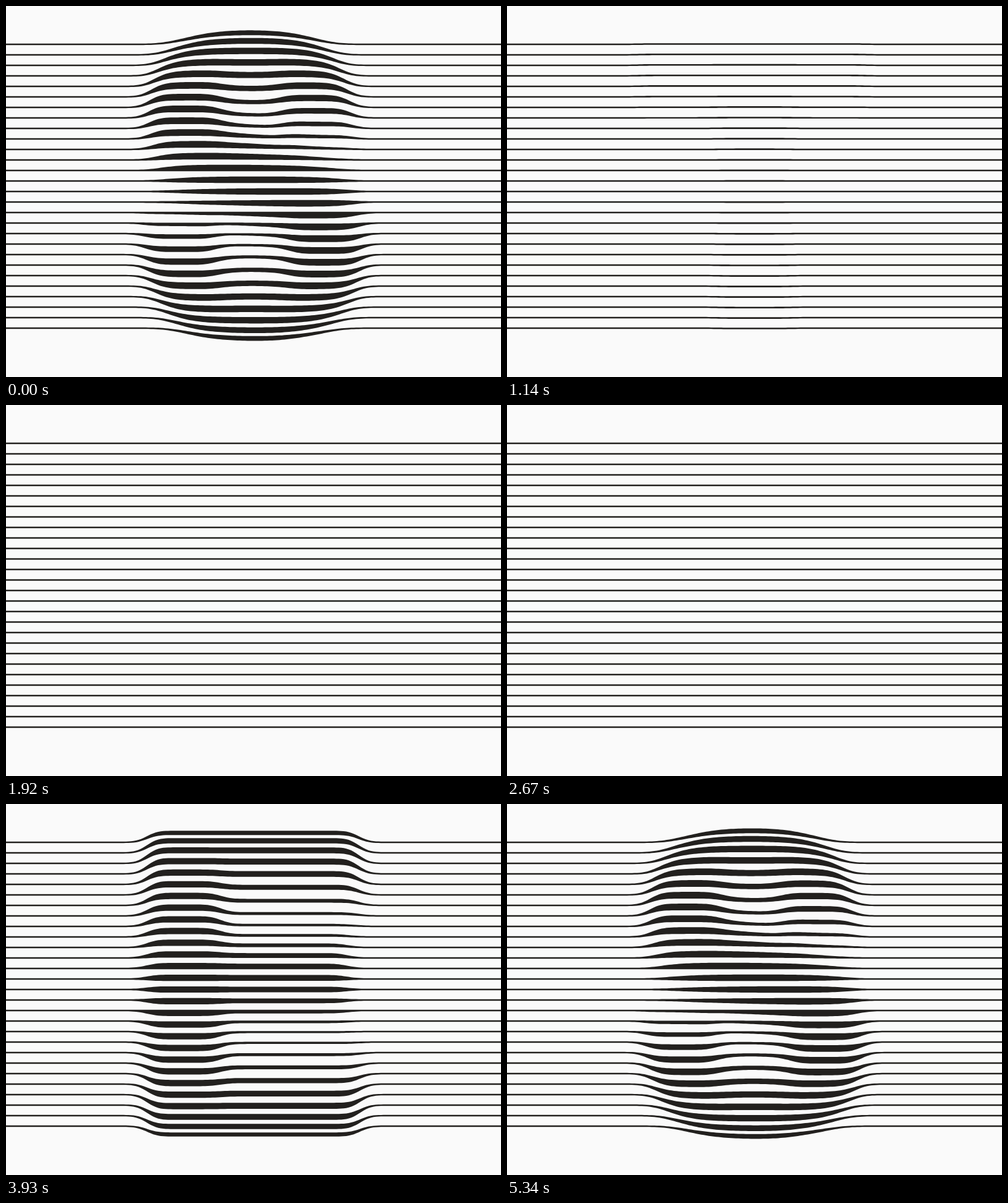
Animation of 800x600 px, one loop 5370 ms. Source, as an HTML page with a canvas:

```html
<!DOCTYPE html>
<html lang="en">
<head>
<meta charset="utf-8">
<title>Striped</title>
<style>
  html, body { margin: 0; width: 100%; height: 100%; overflow: hidden; background: #fafafa; }
  canvas { display: block; }
</style>
</head>
<body>
<canvas id="stage" width="800" height="600"></canvas>
<script>
const W = 800, H = 600, CELL = 4, COLS = W / CELL, ROWS = H / CELL;
const LINES = 28, FIRST = 62, GAP = 17, MIDDLE = 300;
const THIN = 2.4, SWELL = 8.5, PUSH = 0.122;
const LOOP = 5370, SLOT = 750, FADE = 330, HOLD = 90, TICK = 30;

// The letters of the word; the first is a thick stroke, the rest are filled.
const LETTERS = [
  'M506 203C506 140 465 107 395 107C325 107 284 140 284 185C284 245 340 262 400 281' +
    'C470 302 520 325 520 388C520 445 465 474 395 474C325 474 278 440 278 362',
  'M213 57H579V163H460V524H340V163H213Z',
  'M213 57H420C525 57 572 110 572 185C572 245 540 285 495 308L590 524H460L378 330H325V524H213Z' +
    'M325 160H410C445 160 457 175 457 197S445 235 410 235H325Z',
  'M340 57H460V524H340Z',
  'M228 57H430C535 57 588 115 588 210S535 365 430 365H345V524H228Z' +
    'M345 165H420C458 165 472 180 472 211S458 258 420 258H345Z',
  'M228 57H570V163H347V235H551V330H347V418H572V524H228Z',
  'M212 57H400C530 57 590 150 590 290S530 524 400 524H212Z' +
    'M322 172H385C450 172 478 215 478 290S450 410 385 410H322Z'
];

const ctx = document.getElementById('stage').getContext('2d');
const lineY = i => FIRST + GAP * i;

// Gaussian average of value(k) around a position, in cells
function blur(value, count, pos, sigma) {
  let sum = 0, total = 0;
  for (let k = Math.ceil(pos - 3 * sigma); k <= pos + 3 * sigma; k++) {
    const w = Math.exp(-((k - pos) ** 2) / (2 * sigma * sigma));
    total += w;
    if (k >= 0 && k < count) sum += w * value(k);
  }
  return sum / total;
}

// Softened coverage of a letter along every line
function makeField(shape, index) {
  const pad = document.createElement('canvas');
  pad.width = COLS;
  pad.height = ROWS;
  const p = pad.getContext('2d');
  p.scale(1 / CELL, 1 / CELL);
  const path = new Path2D(shape);
  if (index === 0) {
    p.lineWidth = 112;
    p.stroke(path);
  } else {
    p.fill(path, 'evenodd');
  }
  const data = p.getImageData(0, 0, COLS, ROWS).data;
  return Array.from({ length: LINES }, (_, i) => {
    const row = lineY(i) / CELL - 0.5;
    const soft = Array.from({ length: COLS }, (_, c) =>
      blur(r => data[(r * COLS + c) * 4 + 3] / 255, ROWS, row, 7));
    return soft.map((_, c) => blur(k => soft[k], COLS, c, 3.5));
  });
}

const fields = LETTERS.map(makeField);

function strength(distance) {
  const u = Math.min(1, Math.max(0, distance / FADE));
  return 1 - (u * u * (3 - 2 * u)) ** 1.5;
}

function drawLine(y, row, amp) {
  const top = [], bottom = [];
  row.forEach((m, c) => {
    const x = (c + 0.5) * CELL;
    const mid = y + amp * m * PUSH * (y - MIDDLE);
    const half = (THIN + amp * m * SWELL) / 2;
    top.push([x, mid - half]);
    bottom.unshift([x, mid + half]);
  });
  const half = THIN / 2;
  ctx.beginPath();
  ctx.moveTo(0, y - half);
  for (const [x, v] of top) ctx.lineTo(x, v);
  ctx.lineTo(W, y - half);
  ctx.lineTo(W, y + half);
  for (const [x, v] of bottom) ctx.lineTo(x, v);
  ctx.lineTo(0, y + half);
  ctx.fill();
}

function draw(now) {
  let t = Math.floor((now % LOOP) / TICK) * TICK;
  if (t >= LOOP - FADE) t -= LOOP;
  const index = Math.min(LETTERS.length - 1, Math.floor((t + FADE) / SLOT));
  const start = index * SLOT;
  const amp = strength(Math.max(start - t, t - start - HOLD));

  ctx.fillStyle = '#fafafa';
  ctx.fillRect(0, 0, W, H);
  ctx.fillStyle = '#22201e';
  fields[index].forEach((row, i) => drawLine(lineY(i), row, amp));
}

const begin = performance.now();
function frame() {
  draw(performance.now() - begin);
  requestAnimationFrame(frame);
}
frame();
</script>
</body>
</html>
```
